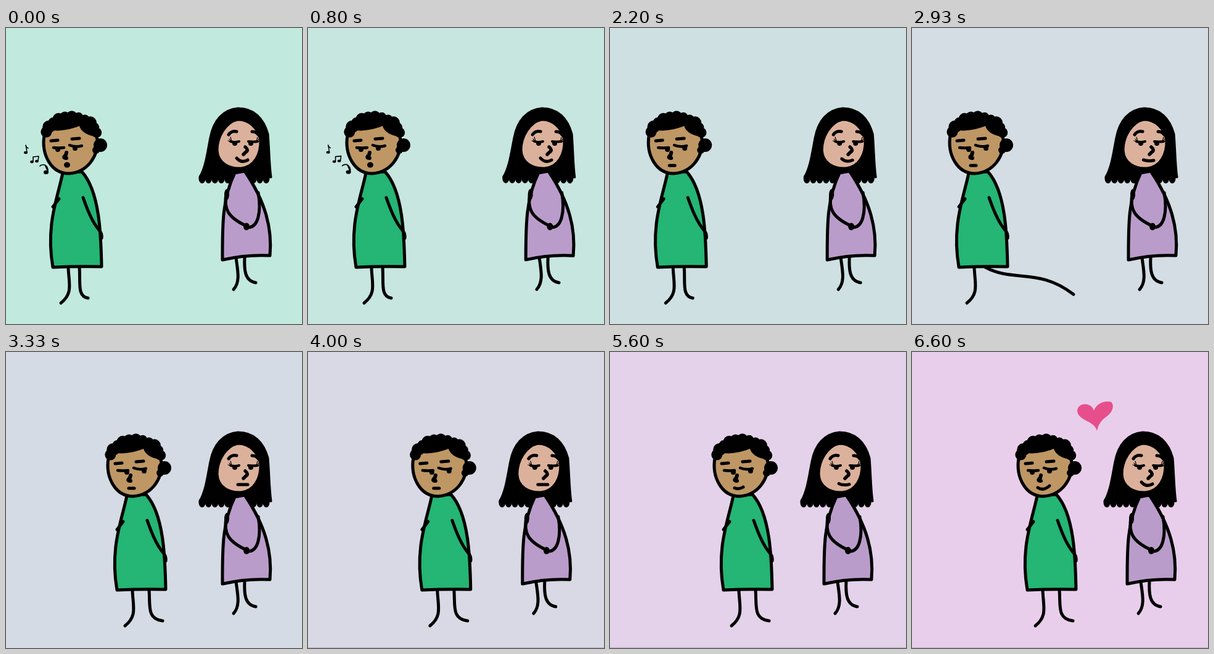
Write an HTML page with a canvas that moves like this. It is 480 by 480 pixels and loops after 6670 ms.

```html
<!DOCTYPE html>
<html>
<head>
<meta charset="utf-8">
<style>
html, body { margin: 0; width: 100%; height: 100%; overflow: hidden; }
canvas { display: block; }
</style>
</head>
<body>
<canvas id="stage" width="480" height="480"></canvas>
<script>
const c = document.getElementById('stage').getContext('2d');
const LOOP = 6670;
c.lineCap = c.lineJoin = 'round';

let t = 0;
const mix = (a, b, k) => a + (b - a) * k;
// Eased 0 to 1 while the time runs from a to b
function ramp(a, b) {
  const k = Math.min(1, Math.max(0, (t - a) / (b - a)));
  return k * k * (3 - 2 * k);
}
const pulse = period => Math.sin(Math.PI * t / period) ** 2;

function line(d, w = 5) {
  c.lineWidth = w;
  c.strokeStyle = '#000';
  c.stroke(new Path2D(d));
}
function shape(d, color, w = 5) {
  c.fillStyle = color;
  c.fill(new Path2D(d));
  if (w) line(d, w);
}
function dot(x, y, rx, ry = rx) {
  c.fillStyle = '#000';
  c.beginPath();
  c.ellipse(x, y, rx, ry, 0, 0, 7);
  c.fill();
}
function at(x, y, paint) {
  c.save();
  c.translate(x, y);
  paint();
  c.restore();
}

const sway = () => 2 * (ramp(0, 900) - ramp(1700, 2900) - 2 * ramp(3500, 4200) + ramp(5650, 6200));

function man() {
  const slide = ramp(3000, 3270);
  const reach = ramp(2700, 2900) * (1 - slide);
  const whistling = t < 1400;
  const look = whistling || t > 5900 ? 0 : 8;

  // Legs: the trailing foot drags, the leading one stretches out first
  const hip = 119 + 9 * slide;
  const foot = 133 + 17 * slide + 129 * reach;
  line(`M101 389C102 415 109 430 ${89 - 30 * Math.sin(Math.PI * slide)} 446`);
  line(`M${hip} 388C${hip + 2 + 44 * reach} 413 ${hip - 4 + 90 * reach} ${mix(435, 388, reach)} ${foot} ${mix(438, 432, reach)}`);

  shape('M92 235C84 275 64 319 76 388Q116 386 155 387C154 335 152 265 123 233Z', '#25b574');
  line('M76 290L86 277');
  line('M125 275C131 292 139 314 152 329Q156 334 155 341');

  shape('M62 174C57 205 73 236 102 236C133 234 150 207 148 181C143 153 115 145 93 149C74 153 65 160 62 174Z', '#be9765');
  shape('M63 172Q72 163 84 165Q104 164 120 157Q123 170 142 174L144 158L122 144L90 144Z', '#000', 3);
  for (let i = 0; i < 11; i++) {
    const a = Math.PI * (1.08 + i * .085);
    dot(106 + 42 * Math.cos(a), 177 + 34 * Math.sin(a), 9 + 1.5 * Math.sin(i * i));
  }
  dot(153, 190, 11);
  dot(146, 198, 6);

  line('M73 183L84 182M107 180L119 179');
  line('M77 194Q86 195 94 194M103 190Q113 194 123 191', 4.5);
  dot(84 + look, 197, 4);
  dot(112 + look, 195, 4);
  line('M98 202L97 206Q91 211 98 211', 6);

  if (whistling) return dot(99, 222, 5, 4.5);
  const s = ramp(5000, 5600) / 2 + ramp(5650, 6100) / 2;
  line(`M${95 - 2 * s} ${223 - s}Q${100 + 2 * s} ${223 + 5 * s} ${104 + 8 * s} ${223 - 4 * s}`);
}

function woman() {
  line('M373 373C376 394 380 412 369 424');
  line('M387 371C386 392 387 410 405 413');

  shape(`M376 130C352 132 336 150 331 178C326 203 324 224 314 242L374 244L380 230L396 242
    L430 242C427 220 427 195 425 172C418 146 402 130 376 130Z`, '#000', 3);
  for (let x = 318; x < 430; x += x === 370 ? 29 : 10.4) dot(x, 244, 5.5, 8);
  shape('M371 235C350 278 351 322 351 376Q390 367 428 369C432 325 421 282 387 232Z', '#ba9cca');
  dot(358, 270, 4, 9);
  line('M357 268C353 293 359 307 390 321');
  line('M409 267C414 296 410 326 390 323');
  dot(390, 322, 5, 6);

  shape(`M376 149C357 153 343 176 343 198C344 219 362 228 381 227
    C402 225 413 205 412 182C409 163 394 149 376 149Z`, '#dcb19b', 3);
  line('M361 173Q366 166 374 168M399 168Q406 168 409 173');
  line('M364 184Q371 186 378 184M393 184Q401 185 408 184', 4);
  for (let i = 0; i < 3; i++) {
    line(`M${364 + i} 184l${i - 4} ${-1 - 3 * i}M${408 - i} 184l${4 - i} ${-1 - 3 * i}`, 1.2);
  }
  dot(371, 187, 4);
  dot(397, 187, 4);
  line('M388 193Q394 198 389 201L385 205', 5.5);

  const s = 1 - .7 * ramp(1700, 2900) - .3 * ramp(2930, 3060) + .4 * ramp(5000, 5600) + .6 * ramp(5650, 6100);
  line(`M${376 - 2 * s} ${215 - 4 * s}Q${383 - s} ${215 + 5 * s} 392 ${215 - s}`);
}

function notes() {
  dot(32, 202, 3, 2.2);
  line('M34 201L32 190Q33 194 36 195', 1.4);
  dot(42, 217, 2.8, 2.2);
  dot(50, 216, 2.8, 2.2);
  line('M44 216L44 209L53 208L52 215', 1.6);
  dot(65, 234, 4, 3.2);
  line('M68 233L63 222Q57 221 55 224M63 222Q69 226 68 233', 1.6);
}

function heart() {
  const size = .4 + .6 * ramp(5900, 6100);
  c.scale(size, size);
  shape('M2 25C-2 8-28 9-30-7C-30-21-8-23-3-8C1-20 15-25 25-22C31-16 27-5 17 2C9 8 4 14 2 25Z', '#e64f8c', 0);
}

function draw(now) {
  t = now % LOOP;
  const k = t / 6600;
  c.fillStyle = `rgb(${193 + 40 * k},${233 - 27 * k},${221 + 14 * k})`;
  c.fillRect(0, 0, 480, 480);
  if (t > 3900) {
    c.fillStyle = '#b5afba';
    c.fillRect(0, 479, 480, 1);
  }

  const x = sway();
  const playing = t < 1400;
  if (playing) at(x - 7 * pulse(700), -2 * pulse(700), notes);
  const walk = 104 * ramp(3000, 3270) + 8 * ramp(3500, 3850) + ramp(5700, 6200);
  at(x + walk, -2 * ramp(3000, 3270), man);
  at(x + 386, 424, () => {
    if (playing) c.rotate(.024 * pulse(700));
    c.translate(-386, -424);
    woman();
  });
  if (t > 5900) at(298, 103, heart);
  requestAnimationFrame(draw);
}
requestAnimationFrame(draw);
</script>
</body>
</html>
```
